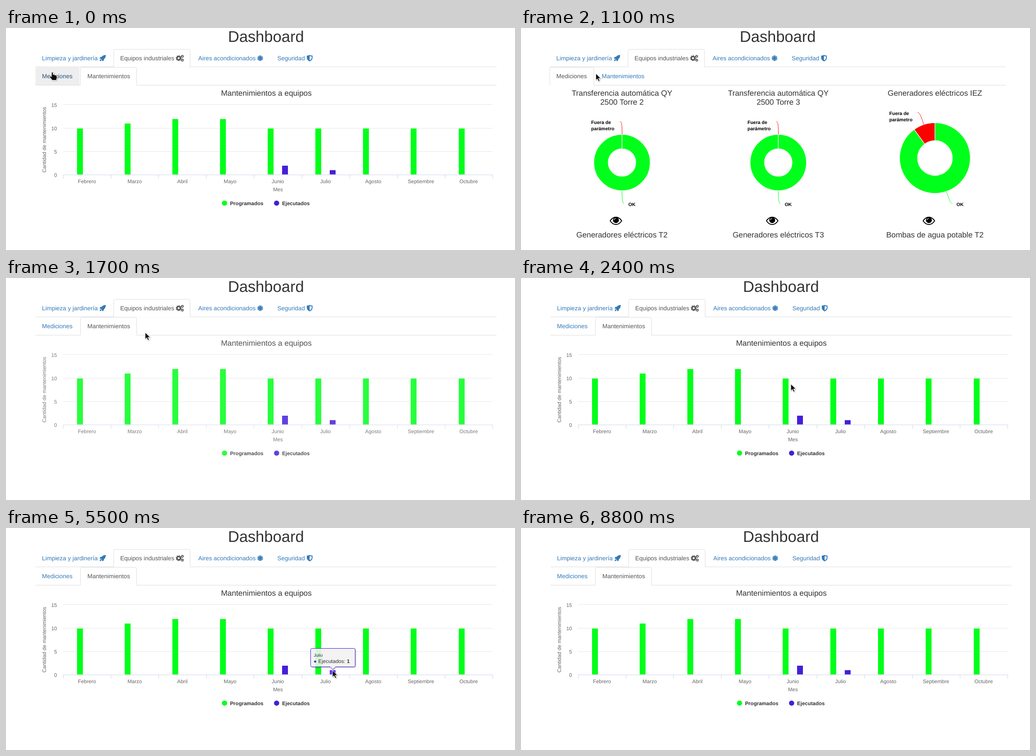
An HTML page that plays this animation: 1132x495 px, repeating every 8.9 s.

```html
<!DOCTYPE html>
<html lang="es">
<head>
<meta charset="utf-8">
<title>Dashboard</title>
<style>
  html, body { margin: 0; width: 100%; height: 100%; overflow: hidden; background: #fff; }
  svg { display: block; width: 100%; height: 100%; }
  text { font-family: "Liberation Sans", Arial, sans-serif; text-rendering: geometricPrecision; white-space: pre; }
  .rule { fill: none; stroke: #ddd; }
  .box { fill: #fff; stroke: #ddd; }
  .link { fill: #337ab7; color: #337ab7; }
  .active { fill: #555; color: #555; }
  .hover { fill: #23527c; }
  .tab .box, .tab .shade { display: none; }
  .tab.active .box, .tab.hover .shade { display: inline; }
  .shade { fill: #eee; }
</style>
</head>
<body>
<svg id="stage" viewBox="0 0 1132 495"></svg>
<script>
const LOOP = 8900, FRAME = 100, ZOOM = 0.96;
const GREEN = '#00ff1a', BLUE = '#451fd8', RED = '#ff0000';
const SERIES = {
  Programados: { color: GREEN, bright: '#19ff33', side: -1, tipWidth: 117, values: [10, 11, 12, 12, 10, 10, 10, 10, 10] },
  Ejecutados: { color: BLUE, bright: '#5e38f1', side: 1, tipWidth: 99, values: [0, 0, 0, 0, 2, 1, 0, 0, 0] }
};
const MONTHS = ['Febrero', 'Marzo', 'Abril', 'Mayo', 'Junio', 'Julio', 'Agosto', 'Septiembre', 'Octubre'];
const PLOT = { left: 127, right: 1082, top: 170.5, bottom: 327.5 };
const STEP = (PLOT.right - PLOT.left) / MONTHS.length;

// Pane and its opacity: [time, pane, opacity]
const PANES = [
  [0, 'bars', 1], [400, 'bars', 0.6], [500, 'bars', 0.1],
  [600, 'pies', 0.55], [700, 'pies', 0.92], [800, 'pies', 1],
  [1400, 'pies', 0.8], [1500, 'pies', 0.335],
  [1600, 'bars', 0.3], [1700, 'bars', 0.85], [1800, 'bars', 1]
];
// Selected sub-tab and hovered sub-tab: [time, selected, hovered]
const TABS = [
  [0, 'mant', 'med'], [400, 'med', ''], [1200, 'med', 'mant'], [1400, 'mant', '']
];
// Pointer gliding up to GLIDE_END, then jumping: [time, x, y]
const GLIDE_END = 2400;
const POINTER = [
  [0, 103, 98], [200, 103, 98], [600, 122, 98], [1000, 150, 102], [1300, 199, 99], [1500, 204, 98],
  [1600, 204, 98], [2000, 626, 190], [2400, 600, 236], [4600, 696, 299], [4900, 714, 316],
  [5200, 726, 317], [6400, 697, 316], [6900, 612, 315], [8400, -50, -50]
];
// Tooltip: [time, x, y, series, month]
const TIPS = [
  [0], [4600, 638, 177, 'Programados', 5], [5200, 676, 267, 'Ejecutados', 5], [5500, 677, 268, 'Ejecutados', 5],
  [6400, 641, 178, 'Programados', 5], [6900, 576, 258, 'Ejecutados', 4], [8400]
];

const text = (x, y, str, size, attrs = '') =>
  `<text x="${x}" y="${y}" font-size="${size * ZOOM}" ${attrs}>${str}</text>`;
const centered = (x, y, str, size, fill) =>
  text(x, y, str, size, `text-anchor="middle" fill="${fill}"`);
const tabBox = (x1, x2, y, bottom, cls) =>
  `<path class="${cls}" d="M${x1} ${bottom}V${y + 4}q0-4 4-4H${x2 - 4}q4 0 4 4V${bottom}"/>`;

const gear = (x, y, r, teeth) => `<g transform="translate(${x} ${y})" fill="none" stroke="currentColor">
  <circle r="${r * 0.62}" stroke-width="${r * 0.5}"/>
  <circle r="${r * 0.88}" stroke-width="${r * 0.32}" pathLength="${teeth * 2}" stroke-dasharray="1"/></g>`;

function icons() {
  const arm = '<path d="M0 0V-6.3M-2.4-5.6L0-3.6L2.4-5.6M-1.7-2.9L0-1.6L1.7-2.9"/>';
  const flake = [0, 60, 120, 180, 240, 300].map(a => `<g transform="rotate(${a})">${arm}</g>`).join('');
  return {
    rocket: `<path d="M222 60.3Q216 60 212.8 64.3L209.6 64.8L208 68.2L211 68.6L213.7 71.4L214 74.3L217.4 72.6L217.8 69.4Q222 66.4 222 60.3ZM211 69.6Q208.8 70.2 208.4 74Q212 73.6 212.8 71.4Z"/>`,
    cogs: gear(384, 67.3, 6.2, 8) + gear(392.2, 63.2, 3.2, 6) + gear(392.2, 71.6, 3.2, 6),
    flake: `<g transform="translate(565.3 67.3)" fill="none" stroke="currentColor" stroke-width="1.4">${flake}</g>`,
    shield: `<path fill-rule="evenodd" d="M669 61.5Q673 61.5 675.3 60Q677.6 61.5 681.7 61.5V66.5Q681.7 71.5 675.3 74.4Q669 71.5 669 66.5ZM675.3 62.4V72Q679.8 69.6 679.8 66.5V63.2Q677.4 63.2 675.3 62.4Z"/>`
  };
}

function header() {
  const icon = icons();
  const subTab = (id, label, x, x1, x2) => `<g id="${id}" class="tab link">
    ${tabBox(x1, x2, 87.5, 127, 'shade')}${tabBox(x1, x2, 87.5, 128, 'box')}${text(x, 112, label, 14)}</g>`;
  return `${centered(0, 31, 'Dashboard', 36, '#333').replace('<text', '<text id="heading"')}
  <g id="nav">
    <path id="rules" class="rule"/>
    <g class="link">${text(80, 72, 'Limpieza y jardinería', 14)}${icon.rocket}
      ${text(427.5, 72, 'Aires acondicionados', 14)}${icon.flake}
      ${text(603.5, 72, 'Seguridad', 14)}${icon.shield}</g>
    ${tabBox(239.5, 409.5, 47.5, 87.2, 'box')}
    <g class="active">${text(254, 72, 'Equipos industriales', 14)}${icon.cogs}</g>
    ${subTab('med', 'Mediciones', 80, 65.5, 163.5)}${subTab('mant', 'Mantenimientos', 181, 165.5, 290.5)}
  </g>`;
}

const monthX = i => PLOT.left + STEP * (i + 0.5);

function column(name, value, i) {
  if (!value) return '';
  const { side, color } = SERIES[name];
  const x = Math.round(monthX(i) + side * STEP * 0.15 - 6.5);
  const y = Math.floor(327.2 - 10.4 * value) + 1;
  return `<rect id="${name}${i}" x="${x - 0.5}" y="${y - 0.5}" width="14" height="${327.5 - y}" fill="${color}" stroke="#fff"/>`;
}

function barChart() {
  const grid = [170.5, 223.5, 275.5].map(y => `M${PLOT.left} ${y}H${PLOT.right}`).join('');
  const ticks = Array.from({ length: 10 }, (_, i) => `M${Math.round(PLOT.left + STEP * i) + 0.5} 327V336`).join('');
  const columns = Object.entries(SERIES).map(([name, s]) => s.values.map((v, i) => column(name, v, i)).join('')).join('');
  const scale = [15, 10, 5, 0].map((n, i) => text(113.5, 175.7 + 52 * i, n, 12, 'text-anchor="end" fill="#666"')).join('');
  const legend = (x, name) => `<circle cx="${x}" cy="390.5" r="5.8" fill="${SERIES[name].color}"/>
    ${text(x + 12.2, 395, name, 12, 'font-weight="bold" fill="#333"')}`;
  return `<g id="bars">
    ${centered(579, 151, 'Mantenimientos a equipos', 18, '#333')}
    <path d="${grid}" stroke="#e6e6e6"/>${columns}
    <path d="M${PLOT.left} 327.5H${PLOT.right}${ticks}" stroke="#ccd6eb"/>
    ${scale}${MONTHS.map((m, i) => centered(monthX(i), 346, m, 12, '#666')).join('')}
    ${centered(604.8, 364, 'Mes', 12, '#666')}
    <g transform="translate(89 249) rotate(-90)">${centered(0, 0, 'Cantidad de mantenimientos', 12, '#666')}</g>
    ${legend(486, 'Programados')}${legend(601.8, 'Ejecutados')}</g>`;
}

function donut(cx, cy, r, share) {
  const hole = r * 0.505, mid = (r + hole) / 2;
  const angle = -2 * Math.PI * share;
  const at = d => `${d * Math.sin(angle)} ${-d * Math.cos(angle)}`;
  const slice = share ? `<path fill="${RED}" d="M0 ${-r}A${r} ${r} 0 0 0 ${at(r)}L${at(hole)}A${hole} ${hole} 0 0 1 0 ${-hole}Z"/>` : '';
  return `<g transform="translate(${cx} ${cy})">
    <circle r="${mid}" fill="none" stroke="${GREEN}" stroke-width="${r - hole}"/>${slice}
    <path d="M0 ${-hole}V${-r}M${at(hole)}L${at(r)}" stroke="#fff" stroke-width="1.4"/></g>`;
}

const EYE = `<path d="M-12.8 0Q-7.5-8.2 0-8.2T12.8 0Q7.5 8.2 0 8.2T-12.8 0Z" fill="none" stroke="#000" stroke-width="1.9"/>
  <circle cy="-1.6" r="6.6"/><path d="M-3.8-1.8Q-3.6-5.2 0-5.5" fill="none" stroke="#fff" stroke-width="1.2"/>`;

function pieCard(cx, title, next, pie) {
  const bold = 'font-weight="bold" fill="#000"';
  const { label: [lx, ly], ok } = pie;
  return `${title.map((line, i) => centered(cx, 151 + 20.2 * i, line, 18, '#333')).join('')}
    ${donut(cx, pie.y, pie.r, pie.share)}
    <path d="${pie.redLine}" fill="none" stroke="${RED}"/><path d="${pie.greenLine}" fill="none" stroke="${GREEN}"/>
    ${text(lx, ly, 'Fuera de', 11, bold)}${text(lx, ly + 13.5, 'parámetro', 11, bold)}${text(ok, 397, 'OK', 11, bold)}
    <g transform="translate(${cx - 13.5} 430)">${EYE}</g>${centered(cx, 467, next, 18, '#333')}`;
}

function pieCharts() {
  const full = cx => ({
    y: 300, r: 62, share: 0, label: [cx - 68.5, 214.3], ok: cx + 14.2,
    redLine: `M${cx - 4.5} 208.5C${cx} 208.5 ${cx} 220 ${cx + 0.3} 237.5`,
    greenLine: `M${cx + 4.5} 392C${cx + 0.5} 389 ${cx} 378 ${cx} 362.5`
  });
  const partial = {
    y: 290, r: 78, share: 0.1, label: [819, 194.3], ok: 968.5,
    redLine: 'M882 188.5C887 188.5 891 200 896 215.5',
    greenLine: 'M959.5 392C955 391 951 379 946 364.5'
  };
  const unit = n => ['Transferencia automática QY', `2500 Torre ${n}`];
  return `<g id="pies">
    ${pieCard(224.6, unit(2), 'Generadores eléctricos T2', full(224.6))}
    ${pieCard(572.2, unit(3), 'Generadores eléctricos T3', full(572.2))}
    ${pieCard(920.6, ['Generadores eléctricos IEZ'], 'Bombas de agua potable T2', partial)}</g>`;
}

function tooltip(x, y, name, month) {
  const { color, tipWidth: w, values } = SERIES[name];
  const c = w / 2;
  return `<g transform="translate(${x + 0.5} ${y + 0.5})">
    <path filter="url(#soft)" fill="#f7f7f7" fill-opacity=".85" stroke="${color}"
      d="M3 0H${w - 3}q3 0 3 3V38q0 3-3 3H${c + 6}l-6 6l-6-6H3q-3 0-3-3V3q0-3 3-3Z"/>
    ${text(7, 18, MONTHS[month], 10, 'fill="#333"')}
    <circle cx="10" cy="29.3" r="2.4" fill="${color}"/>
    ${text(17, 32.5, `${name}: <tspan font-weight="bold">${values[month]}</tspan>`, 12, 'fill="#333"')}</g>`;
}

const POINTERS = `<g id="pointer" filter="url(#soft)" fill="#111" stroke="#fff" stroke-linejoin="round">
  <path id="arrow" d="M0 .5V15.5L3.5 12.2L6 18L8.7 16.8L6.2 11.2H11.2Z"/>
  <path id="hand" d="M-1.8 2Q-1.8 .3 0 .3T1.8 2V6Q4 5 4.8 6.8Q7 6.1 7.6 7.8Q10.3 7.4 10.3 10V13Q10 16 8.5 18.6H-.2Q-2 15.5-5 12.5Q-6.4 10.8-5 9.7Q-3.6 9-1.8 11Z"/></g>`;

const stage = document.getElementById('stage');
stage.innerHTML = `<defs><filter id="soft" x="-20%" y="-20%" width="150%" height="160%">
  <feDropShadow dx="1" dy="1" stdDeviation="1" flood-color="#000" flood-opacity=".35"/></filter></defs>
  ${header()}${barChart()}${pieCharts()}<g id="tip"></g>${POINTERS}`;

const $ = id => document.getElementById(id);
const lastStep = (table, t) => table.findLast(row => row[0] <= t);
const show = (id, on) => $(id).setAttribute('display', on ? 'inline' : 'none');

function pointerAt(t) {
  const [t0, x0, y0] = lastStep(POINTER, t);
  if (t >= GLIDE_END) return [x0, y0];
  const [t1, x1, y1] = POINTER.find(row => row[0] > t);
  const k = (t - t0) / (t1 - t0);
  return [x0 + (x1 - x0) * k, y0 + (y1 - y0) * k];
}

function drawTip(t) {
  const [, x, y, name, month] = lastStep(TIPS, t);
  $('tip').innerHTML = name ? tooltip(x, y, name, month) : '';
  // The brightened column follows the pointer, not the tooltip.
  const hovered = name && !(t >= 4900 && t < 5200) ? name + month : '';
  for (const [key, s] of Object.entries(SERIES))
    for (const i of [4, 5]) $(key + i).setAttribute('fill', key + i === hovered ? s.bright : s.color);
}

function draw(t) {
  const [, pane, opacity] = lastStep(PANES, t);
  for (const id of ['bars', 'pies']) {
    show(id, id === pane);
    $(id).setAttribute('opacity', opacity);
  }
  const narrow = pane === 'pies';
  const end = narrow ? 1079.5 : 1091;
  $('heading').setAttribute('x', narrow ? 571 : 578.2);
  $('nav').setAttribute('transform', `translate(${narrow ? -1.5 : 0} 0)`);
  $('rules').setAttribute('d', `M65.5 86.7H${end}M65.5 127.5H${end}`);

  const [, selected, hovered] = lastStep(TABS, t);
  for (const id of ['med', 'mant'])
    $(id).setAttribute('class', `tab ${id === selected ? 'active' : 'link'} ${id === hovered ? 'hover' : ''}`);

  const [x, y] = pointerAt(t);
  $('pointer').setAttribute('transform', `translate(${x} ${y})`);
  show('hand', hovered);
  show('arrow', !hovered);
  drawTip(t);
}

const start = performance.now();
let shown = -1;
function tick() {
  const t = Math.floor((performance.now() - start) % LOOP / FRAME) * FRAME;
  if (t !== shown) draw(shown = t);
  requestAnimationFrame(tick);
}
tick();
</script>
</body>
</html>
```
